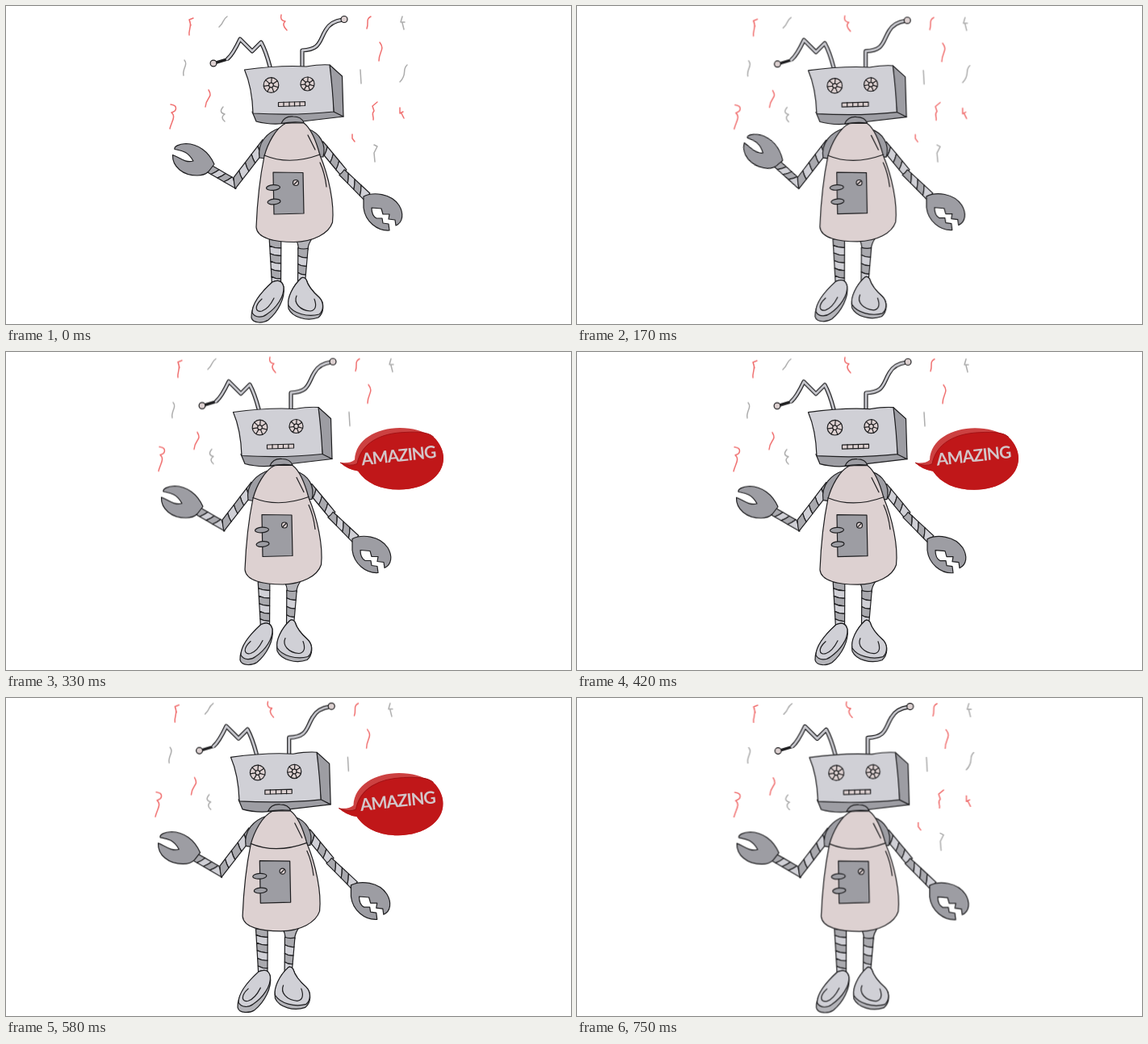
An HTML page for the animation above (0.83 s loop, 700 by 394 pixels).

```html
<!DOCTYPE html>
<html lang="en">
<head>
<meta charset="utf-8">
<title>Amazing robot</title>
<style>
  html, body { margin: 0; width: 100%; height: 100%; overflow: hidden; background: #fff; }
  svg { display: block; width: 100vw; height: 100vh; }

  .robot { fill: #d0d0d6; stroke: #1e1e20; stroke-width: 1.2; stroke-linejoin: round; stroke-linecap: round; }
  .dark { fill: #9d9da3; }
  .mid { fill: #b4b4b9; }
  .band { fill: #a9a9ae; }
  .pink { fill: #ddd1d1; }
  .line { fill: none; }
  .rod-edge, .rod { fill: none; stroke-width: 5.2; }
  .rod { stroke: #c9c9cf; stroke-width: 2.8; }
  .wire { stroke-width: 3.4; }
  .confetti { fill: none; stroke-width: 1.5; stroke-linecap: round; stroke-linejoin: round; }
  .red { stroke: #f07070; }
  .grey { stroke: #acacac; }
  .bubble text { font: 700 21px Lato, "Open Sans", sans-serif; letter-spacing: -1px; fill: #d3c6c9; }

  .shake, .forearm, .bubble, .covered { animation: shake 830ms step-end infinite; }
  .shake { transform-origin: 350px 200px; }
  .forearm { animation-name: wave; transform-origin: 283px 220px; }
  .bubble { animation-name: show; }
  .covered { animation-name: hide; }

  @keyframes shake {
    0% { transform: none; }
    9.63% { transform: translate(-5px, 0); }
    20.48% { transform: translate(-9.3px, 0) scale(.993); }
    30.12% { transform: translate(-12px, -2px); }
    39.75% { transform: translate(-14px, -4.5px); }
    50.6% { transform: translate(-9px, -4.3px); }
    60.24% { transform: translate(-4.6px, -4px); }
    69.87% { transform: translate(-16.5px, -4.5px) scale(1.01); }
    80.72% { transform: translate(-9.3px, -3.9px) scale(1.011); }
    90.36%, 100% { transform: translate(-7px, -4.2px) scale(1.01); }
  }
  @keyframes wave {
    0%, 39.75%, 100% { transform: none; }
    9.63%, 30.12% { transform: rotate(6deg); }
    20.48% { transform: rotate(12deg); }
  }
  @keyframes show {
    0%, 90.36%, 100% { visibility: hidden; }
    39.75% { visibility: visible; }
  }
  @keyframes hide {
    0%, 90.36%, 100% { visibility: visible; }
    39.75% { visibility: hidden; }
  }
</style>
</head>
<body>
<svg viewBox="0 0 700 394">
  <g class="shake">
    <g class="confetti">
      <path class="red" d="M227 36C226 29 231 24 227 17L232 15M227 17L229 24
        M341 11Q339 18 346 19Q341 23 348 30
        M452 13C445 17 450 20 447 28
        M463 45C470 54 462 56 462 68
        M251 104C257 114 248 112 247 125
        M204 122C213 123 212 130 205 132C211 137 205 143 203 152"/>
      <path class="grey" d="M274 13C267 18 271 20 264 26
        M491 13L489 20L494 20M491 21L493 29
        M221 67C226 73 218 78 220 86
        M439 79L440 96
        M269 125Q263 132 271 134Q265 138 271 143"/>
      <g class="covered">
        <path class="red" d="M460 119L454 124L456 130C452 134 456 136 455 141
          M488 126L488 133L492 131M490 133L493 139
          M429 159L429 164L432 168"/>
        <path class="grey" d="M497 73C490 79 498 84 488 94M456 172L460 174L456 182L457 193"/>
      </g>
    </g>

    <g class="robot">
      <path class="line wire" d="M259 70.500L274 66"/>
      <path class="rod-edge" d="M275 65Q281 60 290 41L305 56L316 45Q322 56 327 75"/>
      <path class="rod" d="M274 66Q281 60 290 41L305 56L316 45Q322 56 327 75"/>
      <path class="rod-edge" d="M367 76L367 55C390 54 388 43 396 30Q402 19 417 17"/>
      <path class="rod" d="M367 76L367 55C390 54 388 43 396 30Q402 19 417 17"/>
      <circle class="pink" cx="257" cy="71" r="3.9"/>
      <circle class="pink" cx="419" cy="16.5" r="4"/>

      <g class="forearm">
        <g data-tube="251 201 283 219.5 5 5 4 1 -3 5"></g>
        <path class="dark" d="M258 196C251 180 238 171 223 170.500C214 171 208 174 209 177.500C216 179 225 179 232 192C222 195 214 187 206.500 184.500C206 199 219 210 237 210C245 210 249 207 251 205Z"/>
      </g>
      <g data-tube="322 169 283 219.5 5.3 5 5 1 -3 -5"></g>
      <g data-tube="389 171 418 206 5 5 4 1 3 0"></g>
      <g data-tube="416 206 447 236 4.5 5.5 4 1 4 0"></g>
      <path class="dark" d="M443 236C455 230 477 232 487 247C493 257 492 268 483 272L482 265L474 264L475 258L467 258L465 251L453 250C453 256 455 261 459 263L466 263L467 269L474 270L475 278C460 279 445 267 443 250Z"/>

      <g data-tube="333.5 289 335 346 7.3 5.5 6 2 -1.5 0"></g>
      <path class="mid" d="M358 288Q363 295 362 302L374 302Q374 295 380 287Z"/>
      <g data-tube="368 300 366 342 6.2 4.5 4 2 -1 0"></g>
      <path class="mid" d="M330 342C320 351 303 370 304 386C306 394 319 393 325 389C337 379 346 362 344 348C342 340 337 339 330 342Z"/>
      <path d="M330 342C320 351 305 366 305 380C309 387 318 386 323 382C335 374 345 360 344 348C342 340 337 339 330 342Z"/>
      <path class="line" d="M317 363C307 372 309 380 317 378C323 376 328 370 332 362"/>
      <path class="mid" d="M366 337C355 347 348 363 350 375C355 386 373 391 387 386C394 380 395 368 388 361C380 354 374 346 372 339Q369 335 366 337Z"/>
      <path d="M366 337C355 347 348 362 350 371C356 381 374 386 388 382C394 377 394 367 388 361C380 354 374 346 372 339Q369 335 366 337Z"/>
      <path class="line" d="M360 359C356 368 364 377 377 378C384 377 385 371 382 363"/>

      <path class="dark" d="M340 151C324 156 311 169 314 188L321 189Z"/>
      <path class="dark" d="M373 152C389 157 397 171 393 187L386 187Z"/>
      <path class="pink" d="M347 145C334 151 324 171 320 186C314 215 311 249 310 274C311 288 333 292.500 357 292.500C381 292 400 282 404.500 268C407 245 400 211 389 185C384 166 377 151 369 145Z"/>
      <path class="line" d="M320 185Q351 198 389 184M374 160L383 178M389 194Q395 207 397 224"/>

      <path class="dark" d="M331 206L368 206.500L369 257L332 258Z"/>
      <circle class="pink" cx="359" cy="219" r="3.5"/>
      <path class="line" d="M357 221L361 217"/>
      <ellipse class="dark" cx="331" cy="225" rx="8.500" ry="3.300" transform="rotate(-4 331 225)"/>
      <ellipse class="dark" cx="332" cy="242.500" rx="8" ry="3.300" transform="rotate(-5 332 242)"/>

      <path class="dark" d="M305 131L310 143Q328 148 350 145L418 137L406 130Z"/>
      <path class="dark" d="M401 73L416.500 87L418 137L406 131Z"/>
      <path d="M295.500 79Q340 73 372 75Q390 72 401 73Q405 105 406 131Q360 136 306 133Q305 101 295.500 79Z"/>
      <path class="dark" d="M341 145.500Q345 136 356 137Q366 137 369 144.500Q355 143 341 145.500Z"/>

      <g data-eye="328.500 98 9.300"></g>
      <g data-eye="373.500 96.500 8.500"></g>
      <path class="pink" d="M337.500 119.500L370.500 118.500L370.500 123.500L337.500 124.500Z"/>
      <path class="line" d="M344 119V124M351 119V124M357.500 119V124M364 119V124"/>
    </g>

    <g class="bubble">
      <path fill="#cc4141" d="M428 141.500Q440 143 446 138C447 113 473 98.500 502 98.500C533 98.500 556 114 556 136C556 158 533 175 501 175C478 175 460 167 450 152Q437 150 428 141.500Z"/>
      <path fill="#c01719" d="M428 141.500Q441 147 449 143C454 117 478 105 508 104C526 103 538 104 544 110C552 117 556 128 556 136C556 158 533 175 501 175C478 175 460 167 450 152Q437 150 428 141.500Z"/>
      <path fill="none" stroke="#a31215" d="M428 141.500Q441 147 449 143C454 117 478 105 508 104C526 103 538 104 544 110"/>
      <text x="455" y="145" transform="rotate(-6 455 145)">AMAZING</text>
    </g>
  </g>
</svg>
<script>
  const add = (parent, d, cls) => {
    const path = document.createElementNS("http://www.w3.org/2000/svg", "path");
    path.setAttribute("d", d);
    path.setAttribute("class", cls);
    parent.append(path);
  };
  const nums = text => text.split(" ").map(Number);

  // Tapered limb made of n bands; edges bulge and slant, the far end is mitred.
  for (const g of document.querySelectorAll("[data-tube]")) {
    const [x1, y1, x2, y2, r1, r2, n, bulge, slant, miter] = nums(g.dataset.tube);
    const len = Math.hypot(x2 - x1, y2 - y1);
    const ux = (x2 - x1) / len, uy = (y2 - y1) / len;
    const at = (k, side) => {
      const r = (r1 + (r2 - r1) * k) * side;
      const skew = k === 0 ? 0 : k === 1 ? miter : slant;
      const along = len * k + skew * side + (side ? 0 : bulge);
      return `${x1 + ux * along - uy * r} ${y1 + uy * along + ux * r}`;
    };
    for (let i = 0; i < n; i++) {
      const a = i / n, b = (i + 1) / n;
      add(g, `M${at(a, -1)}Q${at(a, 0)} ${at(a, 1)}L${at(b, 1)}Q${at(b, 0)} ${at(b, -1)}Z`, i % 2 ? "" : "band");
    }
  }

  const ring = (x, y, r) => `M${x - r} ${y}a${r} ${r} 0 1 0 ${2 * r} 0a${r} ${r} 0 1 0 ${-2 * r} 0`;
  for (const g of document.querySelectorAll("[data-eye]")) {
    const [x, y, r] = nums(g.dataset.eye);
    add(g, ring(x, y, r), "pink");
    let spokes = ring(x, y, 2.8);
    for (let i = 0; i < 7; i++) {
      const c = Math.cos(i * Math.PI / 3.5 + .3), s = Math.sin(i * Math.PI / 3.5 + .3);
      spokes += `M${x + 2.8 * c} ${y + 2.8 * s}L${x + r * c} ${y + r * s}`;
    }
    add(g, spokes, "line");
  }
</script>
</body>
</html>
```
